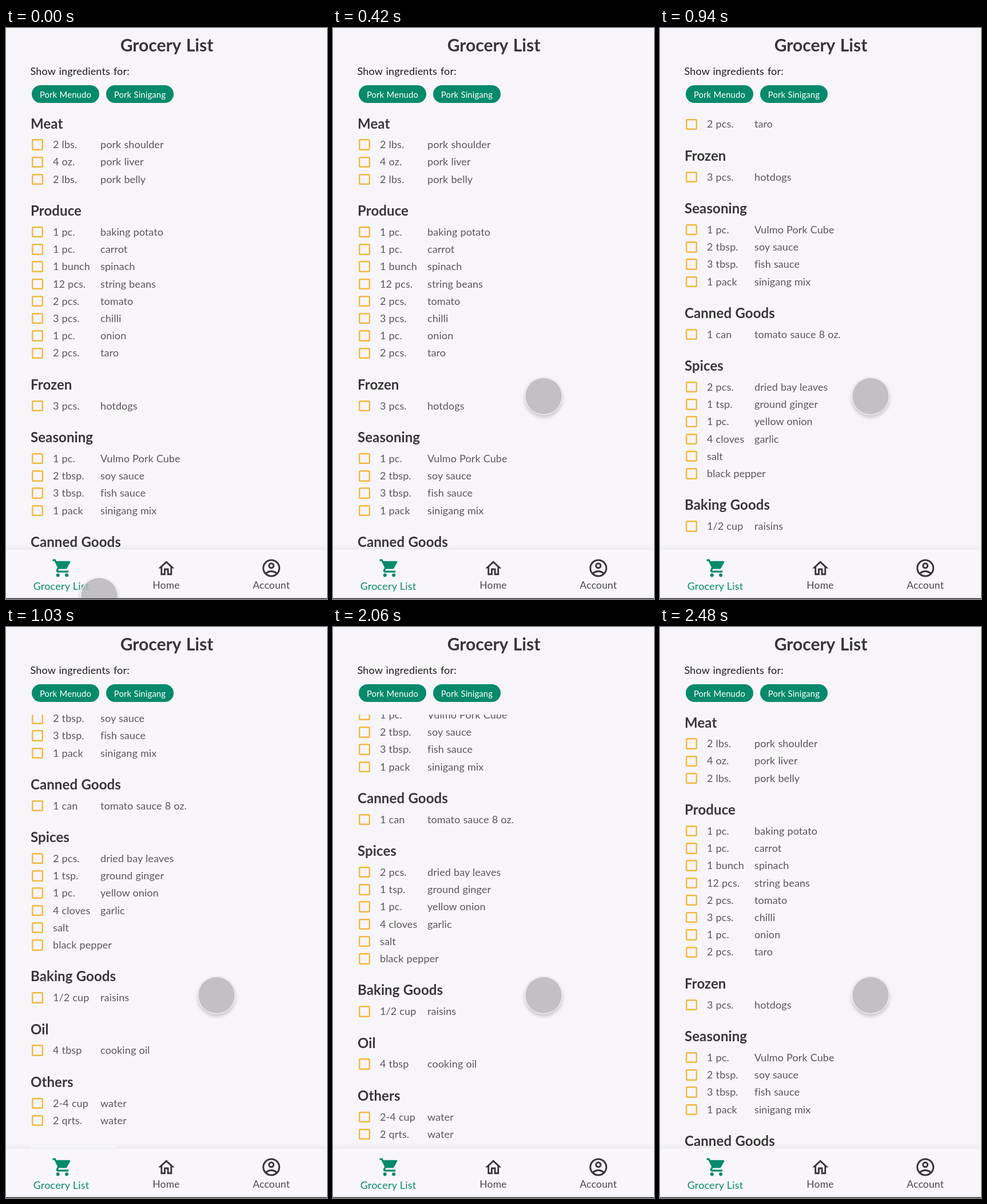
Write an HTML page that moves like this. It is 561x998 px and loops after 2.51 s.

```html
<!DOCTYPE html>
<html lang="en">
<head>
<meta charset="utf-8">
<title>Grocery List</title>
<style>
  html, body { margin: 0; width: 100%; height: 100%; overflow: hidden; background: #f7f5f9; }
  #stage {
    position: relative; width: 561px; height: 998px; overflow: hidden;
    background: #f7f5f9; color: #38363b;
    font: 18px Lato, sans-serif; letter-spacing: .005em; word-spacing: .02em;
  }
  #stage * { position: absolute; white-space: nowrap; }
  /* Text is placed by its vertical centre. */
  .text { line-height: 30px; margin-top: -16px; }
  .centered { transform: translateX(-50%); }
  .title { left: 281px; top: 30px; font-size: 30px; font-weight: 700; letter-spacing: 0; word-spacing: .06em; }
  .intro { left: 42.5px; top: 76px; color: #1d1c1f; letter-spacing: .01em; word-spacing: .06em; }
  .chip {
    top: 100px; width: 118.5px; height: 31px; border-radius: 16px; background: #078a6c;
    color: #fff; font-size: 14.8px; line-height: 32px; text-align: center; letter-spacing: .01em;
  }
  #view { left: 0; top: 153px; width: 561px; height: 758px; overflow: hidden; }
  #list { left: 0; top: -153px; width: 561px; height: 1600px; }
  .head { left: 43px; font-size: 24px; font-weight: 700; }
  .item { color: #5a585e; }
  .box {
    left: 45.3px; width: 19.4px; height: 19.4px; margin-top: -9.9px;
    box-shadow: inset 0 0 0 2.4px #f2b840; border-radius: 2.5px;
  }
  .button { left: 43px; width: 151px; height: 40px; background: #fcfbfd; }
  #nav {
    left: 0; top: 911px; width: 561px; height: 87px; box-sizing: border-box;
    background: #f8f6fa; border-top: 1px solid #ededf0; box-shadow: 0 -3px 9px rgba(0, 0, 0, .05);
  }
  #icons { left: 0; top: 0; }
  .label { font-size: 17.5px; color: #4a484d; letter-spacing: .01em; }
  .active { font-size: 18px; color: #078a6c; }
  #pointer {
    left: -33px; top: -33px; width: 66px; height: 66px; box-sizing: border-box; border-radius: 50%;
    background: rgba(180, 179, 181, .8); border: 1px solid #fff; background-clip: padding-box;
    box-shadow: 0 0 1px rgba(0, 0, 0, .45), 0 4px 6px rgba(0, 0, 0, .2);
  }
  #edge { left: 0; top: 996px; width: 561px; height: 2px; background: linear-gradient(#a5a4a7 50%, #29282b 50%); }
</style>
</head>
<body>
<div id="stage">
  <div class="text centered title">Grocery List</div>
  <div class="text intro">Show ingredients for:</div>
  <div class="chip" style="left:44.7px">Pork Menudo</div>
  <div class="chip" style="left:174.7px">Pork Sinigang</div>
  <div id="view"><div id="list"></div></div>
  <div id="nav"></div>
  <svg id="icons" width="561" height="998" fill="#38363b">
    <path fill="#078a6c" transform="translate(80 925.5) scale(1.54)" d="M7 18a2 2 0 1 0 0 4 2 2 0 0 0 0-4zM1 2v2h2l3.6 7.6-1.35 2.4C4.5 15.4 5.5 17 7 17h12v-2H7.4c-.2 0-.3-.2-.2-.4l.9-1.6h7.45c.75 0 1.4-.4 1.75-1l3.6-6.5A1 1 0 0 0 20 4H5.2l-.95-2zm16 16a2 2 0 1 0 0 4 2 2 0 0 0 0-4z"/>
    <path transform="translate(263.2 926.9) scale(1.42 1.47)" d="M12 5.7l5 4.5V18h-2v-6H9v6H7v-7.8l5-4.5M12 3L2 12h3v8h6v-6h2v6h6v-8h3z"/>
    <g fill="none" stroke="#38363b" stroke-width="3">
      <circle cx="463.7" cy="944" r="14"/>
      <circle cx="463.7" cy="939.8" r="4"/>
      <path d="M453.5 953.5q10.2-8 20.4 0"/>
    </g>
  </svg>
  <div class="text centered label active" style="left:96.5px;top:976px">Grocery List</div>
  <div class="text centered label" style="left:280px;top:974.5px">Home</div>
  <div class="text centered label" style="left:463.7px;top:974.5px">Account</div>
  <div id="pointer"></div>
  <div id="edge"></div>
</div>
<script>
  const LOOP = 2510;
  const FRAME = 30;
  const list = document.getElementById('list');

  const sections = {
    'Meat': ['2 lbs.|pork shoulder', '4 oz.|pork liver', '2 lbs.|pork belly'],
    'Produce': ['1 pc.|baking potato', '1 pc.|carrot', '1 bunch|spinach', '12 pcs.|string beans',
      '2 pcs.|tomato', '3 pcs.|chilli', '1 pc.|onion', '2 pcs.|taro'],
    'Frozen': ['3 pcs.|hotdogs'],
    'Seasoning': ['1 pc.|Vulmo Pork Cube', '2 tbsp.|soy sauce', '3 tbsp.|fish sauce', '1 pack|sinigang mix'],
    'Canned Goods': ['1 can|tomato sauce 8 oz.'],
    'Spices': ['2 pcs.|dried bay leaves', '1 tsp.|ground ginger', '1 pc.|yellow onion',
      '4 cloves|garlic', 'salt', 'black pepper'],
    'Baking Goods': ['1/2 cup|raisins'],
    'Oil': ['4 tbsp|cooking oil'],
    'Others': ['2-4 cup|water', '2 qrts.|water']
  };

  function add(className, top, text = '', left) {
    const el = document.createElement('div');
    el.className = className;
    el.style.top = top + 'px';
    if (left) el.style.left = left + 'px';
    el.textContent = text;
    list.append(el);
  }

  let y = 167.5;
  for (const [name, items] of Object.entries(sections)) {
    add('text head', y, name);
    y += 36.7;
    for (const item of items) {
      const [amount, food] = item.split('|');
      add('box', y);
      add('text item', y, amount, 82);
      if (food) add('text item', y, food, 165);
      y += 30.23;
    }
    y += 25.25;
  }
  add('button', 1529);

  // Rows are [ms, transform]; each pose holds until the next row.
  function play(el, rows) {
    const frames = rows.map(([ms, transform]) => ({ offset: ms / LOOP, transform, easing: 'step-end' }));
    frames.push({ ...frames[frames.length - 1], offset: 1 });
    el.animate(frames, { duration: LOOP, iterations: Infinity });
  }

  const scroll = [
    [0, 0], [790, 10], [820, 33], [850, 76], [880, 146.3], [910, 262], [940, 400], [970, 525], [1000, 600], [1030, 623],
    [2030, 616], [2060, 599], [2090, 555], [2120, 478], [2150, 372], [2180, 252], [2210, 140], [2240, 55], [2270, 12], [2300, 0]
  ];
  play(list, scroll.map(([ms, top]) => [ms, `translateY(${-top}px)`]));

  const from = [163, 993], to = [368, 643.5], travel = 13;
  play(document.getElementById('pointer'), Array.from({ length: travel + 1 }, (_, i) => {
    const p = Math.sin(i / travel * Math.PI / 2);
    const [x, y] = from.map((v, axis) => v + (to[axis] - v) * p);
    return [i * FRAME, `translate(${x}px, ${y}px)`];
  }));
</script>
</body>
</html>
```
